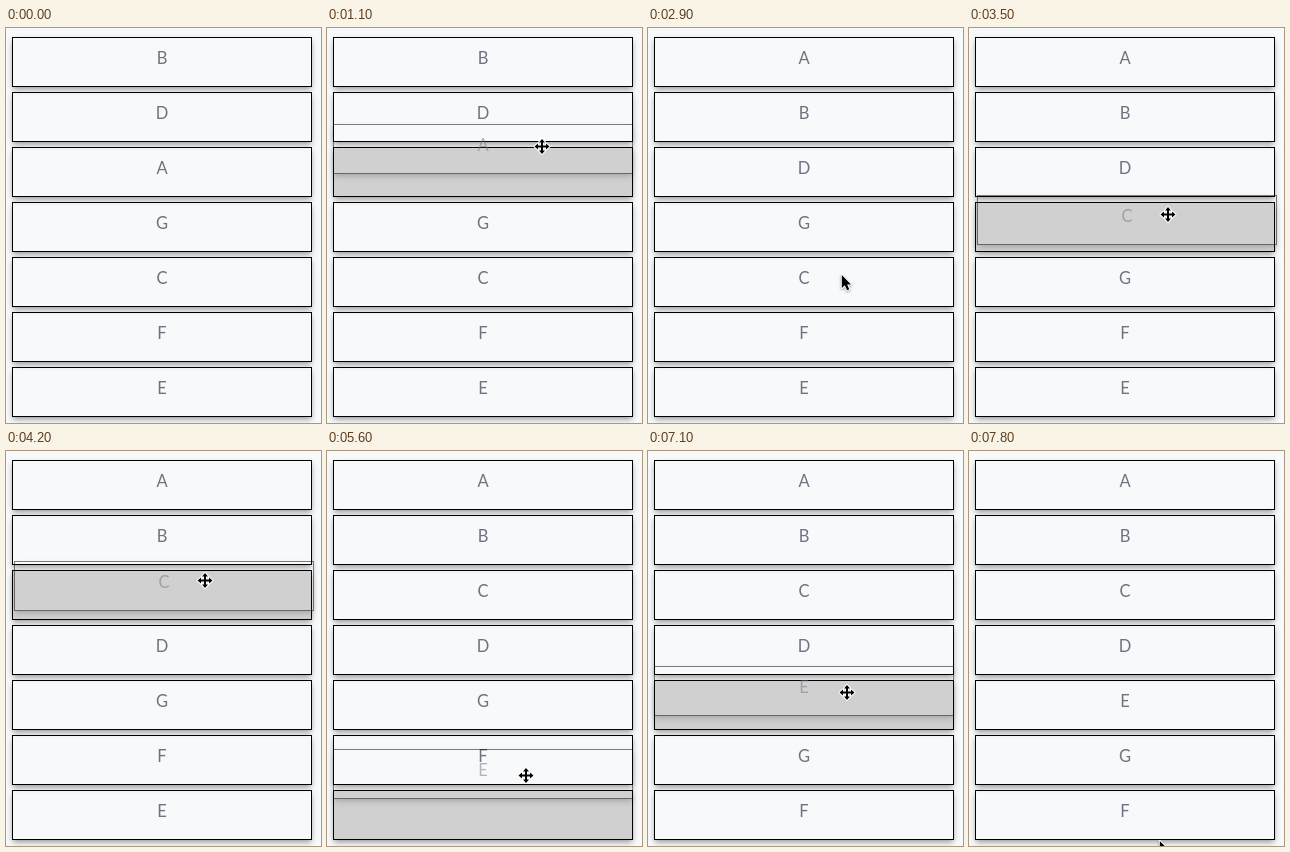
Write an HTML page that moves like this. It is 315x395 px and loops after 8 s.

```html
<!DOCTYPE html>
<html lang="en">
<head>
<meta charset="utf-8">
<title>Sortable list</title>
<style>
  html, body { margin: 0; width: 100%; height: 100%; overflow: hidden; background: #f7f9fb; }
  #stage { position: relative; width: 315px; height: 395px; overflow: hidden; }
  .item {
    position: absolute; left: 6px; top: 9px; width: 300px; height: 50px;
    box-sizing: border-box; border: 1px solid #000;
    box-shadow: 0 3px 6px -1px rgba(0, 0, 0, .42);
    font: 16.5px/41px Lato, sans-serif; text-align: center; color: #6f737f;
  }
  .slot { background: #d0d0d0; color: transparent; }
  #ghost { opacity: .5; }
  svg { position: absolute; left: 0; top: 0; overflow: visible; }
  path { stroke: #fff; stroke-width: 2; stroke-linejoin: round; paint-order: stroke; }
  #arrow { filter: drop-shadow(0 1px 1px rgba(0, 0, 0, .35)); }
</style>
</head>
<body>
<div id="stage">
  <div id="ghost" class="item"></div>
  <svg id="arrow" width="12" height="18"><path d="M0 0V13L3 10.3L5.3 15.2L7.5 14.2L5.3 9.4H9.2Z"/></svg>
  <svg id="move" width="1" height="1"><path d="M0-7.5L3-4H1V-1H4V-3L7.5 0L4 3V1H1V4H3L0 7.5L-3 4H-1V1H-4V3L-7.5 0L-4-3V-1H-1V-4H-3Z"/></svg>
</div>
<script>
const LOOP = 8000, STEP = 100, PITCH = 55, ENTER = 200;
const START = [...'BDAGCFE'];

// The pointer rests between moves; an item stays held until a move without drag.
const moves = [
  { from: 100, to: 500, x: 215, y: 141 },
  { from: 900, to: 1600, x: 217, y: 27, drag: 'A' },
  { from: 1800, to: 2900, x: 197, y: 248 },
  { from: 3200, to: 3800, x: 201, y: 124, drag: 'C' },
  { from: 4000, to: 4200, x: 199, y: 129, drag: 'C' },
  { from: 4200, to: 4800, x: 199, y: 365 },
  { from: 5100, to: 5600, x: 199, y: 324, drag: 'E' },
  { from: 5600, to: 6600, x: 199, y: 298, drag: 'E' },
  { from: 6600, to: 7100, x: 199, y: 241, drag: 'E' },
  { from: 7300, to: 7800, x: 194, y: 391 }
];

const $ = id => document.getElementById(id);
const stage = $('stage'), ghost = $('ghost'), arrow = $('arrow'), move = $('move');
const place = (el, x, y) => { el.style.transform = `translate(${x}px, ${y}px)`; };
const show = (el, on) => { el.style.visibility = on ? 'visible' : 'hidden'; };
const ease = u => u * u * (3 - 2 * u);
const mix = (a, b, k) => Math.round(a + (b - a) * k);

const items = {};
for (const name of START) {
  const el = items[name] = document.createElement('div');
  el.textContent = name;
  stage.insertBefore(el, ghost);
}

// An item moves up once the pointer passes the middle of the row above.
function reorder(order, name, home, y) {
  const row = Math.floor((y - 34) / PITCH) + 1;
  order.splice(order.indexOf(name), 1);
  order.splice(Math.max(0, Math.min(home, row)), 0, name);
}

function stateAt(t) {
  const order = [...START];
  let x = 260, y = 179, held, grab;
  for (const m of moves) {
    if (m.from >= t) break;
    if (m.drag && m.drag !== held) grab = { x, y, row: order.indexOf(m.drag) };
    held = m.drag;
    const k = ease(Math.min(1, (t - m.from) / (m.to - m.from)));
    x = mix(x, m.x, k);
    y = mix(y, m.y, k);
    if (held) reorder(order, held, grab.row, y);
  }
  return { order, x, y, held, grab };
}

function draw(t) {
  const { order, x, y, held, grab } = stateAt(t);
  order.forEach((name, i) => {
    place(items[name], 0, i * PITCH);
    items[name].className = name === held ? 'item slot' : 'item';
  });
  if (held) {
    ghost.textContent = held;
    place(ghost, x - grab.x, grab.row * PITCH + y - grab.y);
  }
  show(ghost, held);
  show(move, held);
  show(arrow, !held && t >= ENTER);
  place(move, x, y + .5);
  place(arrow, x - 3.2, y - 1);
}

function tick() {
  const t = performance.now() % LOOP;
  draw(Math.floor(t / STEP) * STEP);
  requestAnimationFrame(tick);
}
tick();
</script>
</body>
</html>
```
